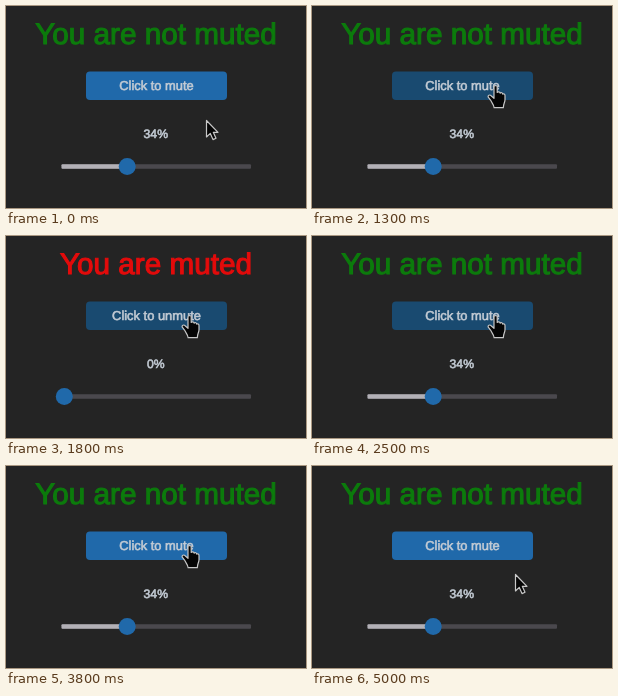
Write an HTML page that moves like this. It is 300x202 px and loops after 6000 ms.

```html
<!DOCTYPE html>
<html lang="en">
<head>
<meta charset="utf-8">
<title>Mute toggle</title>
<style>
  html, body { margin: 0; width: 100%; height: 100%; overflow: hidden; background: #242424; }
  svg { display: block; width: 300px; height: 202px; }
  text { font-family: "Liberation Sans", Arial, sans-serif; text-anchor: middle; text-rendering: geometricPrecision; }
  #title { font-size: 29.7px; stroke-width: 1.1px; }
  .small { fill: #c3cbd4; stroke: #c3cbd4; stroke-width: .6px; }
  #label { font-size: 12.9px; }
  #percent { font-size: 12.2px; }
  .cursor path { fill: #050505; stroke: #c8c8c8; stroke-width: 1.2px; stroke-linejoin: round; }
</style>
</head>
<body>
<svg viewBox="0 0 300 202">
  <rect width="300" height="202" fill="#242424"/>
  <text id="title" x="150" y="38"></text>
  <rect id="button" x="80" y="65.5" width="141" height="28.5" rx="4"/>
  <text id="label" class="small" x="150.5" y="83.8"></text>
  <text id="percent" class="small" x="149.8" y="132.3"></text>
  <rect x="55.5" y="158.3" width="189.5" height="4.4" rx="1" fill="#4a484d"/>
  <rect id="fill" x="55.5" y="158.3" height="4.4" rx="1" fill="#b2b0b6"/>
  <circle id="knob" cy="160.5" r="8.5" fill="#2069aa"/>
  <g id="arrow" class="cursor">
    <path d="M.5 .5V17L4.3 13.4L7 19.6L10 18.3L7.3 12.3H12Z"/>
  </g>
  <g id="hand" class="cursor">
    <path d="M-1.7 1.4C-1.7-.4 1.5-.4 1.5 1.4V7C2 6 4.3 6.1 4.5 7.6C5.2 6.8 7 7.2 7.1 8.6C8 8 9.3 8.5 9.3 10V14.2C9.3 16.8 7.8 18 7.6 22.2H-1.6C-1.8 19.2-3.8 17.4-5.2 14.6L-7.6 11.4C-8 9.8-6 8.8-4.6 10.2L-1.7 12.8Z"/>
  </g>
</svg>
<script>
  const LOOP = 6000;
  const BRIGHT = '#2069aa', MID = '#1c598c', DARK = '#194a70';

  // [time, muted]
  const states = [[0, false], [1500, true], [2300, false], [3200, true], [3800, false]];

  // [time, button colour]
  const tints = [
    [0, BRIGHT], [1200, MID], [1300, DARK], [1500, BRIGHT], [1600, DARK],
    [2300, BRIGHT], [2400, MID], [2500, DARK], [3200, BRIGHT], [3300, DARK],
    [3800, BRIGHT], [3900, MID], [4000, DARK], [4800, MID], [4900, BRIGHT]
  ];

  // [time, cursor, x, y]
  const moves = [
    [0, 'arrow', 200, 114], [1000, 'arrow', 199, 107], [1100, 'arrow', 195, 96],
    [1200, 'hand', 188, 85], [1300, 'hand', 183.7, 79.5],
    [4600, 'hand', 186, 82], [4700, 'hand', 191, 88],
    [4800, 'arrow', 197, 98], [4900, 'arrow', 201, 105], [5000, 'arrow', 203, 108]
  ];

  const el = id => document.getElementById(id);
  const at = (steps, t) => steps.filter(s => s[0] <= t).pop();

  function draw(t) {
    const muted = at(states, t)[1];
    const volume = muted ? 0 : 34;
    const color = muted ? '#e30b0b' : '#0c7b0c';
    const title = el('title');
    title.textContent = muted ? 'You are muted' : 'You are not muted';
    title.setAttribute('fill', color);
    title.setAttribute('stroke', color);
    el('label').textContent = muted ? 'Click to unmute' : 'Click to mute';
    el('percent').textContent = volume + '%';

    const x = 58.3 + volume * 1.85;
    el('knob').setAttribute('cx', x);
    el('fill').setAttribute('width', x - 55.5);
    el('fill').style.visibility = muted ? 'hidden' : 'visible';
    el('button').setAttribute('fill', at(tints, t)[1]);

    const [, kind, cx, cy] = at(moves, t);
    for (const id of ['arrow', 'hand']) {
      el(id).style.display = id === kind ? '' : 'none';
      el(id).setAttribute('transform', `translate(${cx} ${cy})`);
    }
  }

  const start = performance.now();
  function tick() {
    draw((performance.now() - start) % LOOP);
    requestAnimationFrame(tick);
  }
  tick();
</script>
</body>
</html>
```
